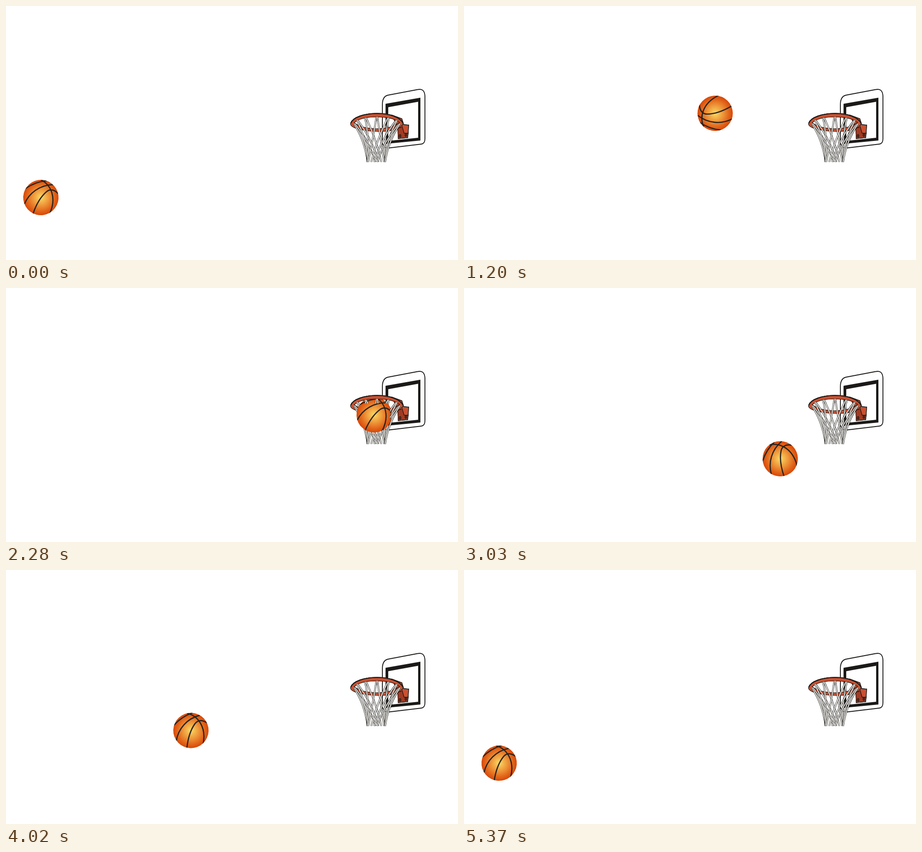
An HTML page with a canvas that plays this animation: 998x561 px, repeating every 5.4 s.

```html
<!DOCTYPE html>
<html lang="en">
<head>
<meta charset="utf-8">
<title>Basketball shot</title>
<style>
  html, body { margin: 0; width: 100%; height: 100%; overflow: hidden; background: #fff; }
  canvas { display: block; }
</style>
</head>
<body>
<canvas id="stage" width="998" height="561"></canvas>
<script>
const ctx = document.getElementById('stage').getContext('2d');
const HOP = 900, STEP = 30, R = 39, INK = '#1b1a18', RIM = '#cb5030';

// Six equal stretches: two handles, the end point, and the turn in degrees.
const start = [77, 423], startAngle = 37.5;
const hops = [
  { path: [[228, 433], [367, 291], [494, 393]], turn: 403 },
  { path: [[529, 226], [647, 80], [790, 62]], turn: 532 },
  { path: [[835, 115], [802, 421], [806, 435]], turn: 280 },
  { path: [[720, 354], [589, 351], [515, 422]], turn: 510 },
  { path: [[444, 333], [362, 333], [268, 411]], turn: 133 },
  { path: [[183, 300], [118, 379], [73, 432]], turn: 302 }
];

function ballAt(t) {
  const n = Math.floor(t / HOP), u = t / HOP - n, v = 1 - u;
  const [b, c, d] = hops[n].path, a = n ? hops[n - 1].path[2] : start;
  const [x, y] = [0, 1].map(k =>
    a[k] * v ** 3 + 3 * b[k] * v * v * u + 3 * c[k] * v * u * u + d[k] * u ** 3);
  const angle = hops.slice(0, n).reduce((sum, h) => sum + h.turn, startAngle) + hops[n].turn * u;
  return { x, y, angle };
}

function shape(d, fill, width, ink = INK) {
  const p = new Path2D(d);
  if (fill) { ctx.fillStyle = fill; ctx.fill(p, 'evenodd'); }
  if (width) { ctx.lineWidth = width; ctx.strokeStyle = ink; ctx.stroke(p); }
}

function drawBoard() {
  shape('M831 218Q831 200 843 197L909 184.5Q924 181 925 199V293Q925 304 917 305L846 313.5Q832 314 831 300Z', '#fff', 1.9);
  shape('M838 216L915 202.5V297L838 304.5ZM844 223.5V298L910 291V211.5Z', INK);
}

function drawRim() {
  shape('M865 270L877 267L879 280L888 281L887 291L866 293Z', '#a23a22', 1.2);
  shape('M852 241L874 249L878 262L889 263L888 281L879 281L874 264L862 262Z', RIM, 1.4);
  for (const [x, y] of [[870, 287], [883, 285]]) {
    shape(`M${x - 2} ${y}a2 3.2 0 1 0 4 0a2 3.2 0 1 0 -4 0`, '#6b2a1c', 1.2);
  }
  shape('M761 259C766 246 790 237 819 237C849 237 870 246 877 259C874 271 849 278 818 277C790 276 757 269 761 259Z' +
        'M769 258C779 265 796 271 818 271C842 271 858 266 869 257C858 248 841 245 818 245C796 245 778 249 769 258Z', RIM, 1.2);
  shape('M761 259C766 246 790 237.5 819 237.5C849 237.5 870 246 877 259', null, 2.2);
}

// Each hook on the far rim drops two strands that cross their neighbours.
function drawNet() {
  for (let i = 0; i <= 6; i++) {
    const u = i / 6, x = 819 - 50 * Math.cos(Math.PI * u), y = 260 - 15 * Math.sin(Math.PI * u);
    for (const side of [-1, 1]) {
      const end = Math.min(1, Math.max(0, u + side * 0.45));
      const mid = 793 + 51 * (u * 0.6 + end * 0.4), foot = 798 + 39 * end;
      const d = `M${x + side} ${y}Q${mid} 298 ${foot} 345`;
      shape(d, null, 3.5);
      shape(d, null, 1.9, '#fbfaf5');
    }
  }
}

function drawHoop() {
  drawRim();
  ctx.save();
  ctx.beginPath();
  ctx.rect(750, 230, 140, 114.5);
  ctx.clip();
  drawNet();
  ctx.restore();
}

function drawBall({ x, y, angle }) {
  ctx.save();
  ctx.translate(x, y);
  ctx.rotate(angle * Math.PI / 180);
  ctx.beginPath();
  ctx.arc(0, 0, R, 0, 7);
  ctx.clip();
  const glow = ctx.createRadialGradient(0, 0, 0, 0, 0, R);
  ['#fbdc66', '#f4b44c', '#ec9036', '#e36a1d', '#d84708']
    .forEach((color, i) => glow.addColorStop(i / 4, color));
  ctx.fillStyle = glow;
  ctx.fillRect(-R, -R, 2 * R, 2 * R);
  shape('M8 39Q-3 6 2 -18Q6 -33 26 -30M-20 34C-27 8 -19 -20 4 -39' +
        'M-39 5Q-31 -20 -12 -38M-24 -31C0 -36 28 -22 37 16', null, 2.6, '#25231f');
  ctx.restore();
}

function draw(now) {
  const t = Math.floor(now % (HOP * hops.length) / STEP) * STEP;
  ctx.clearRect(0, 0, 998, 561);
  drawBoard();
  drawHoop();
  drawBall(ballAt(t));
  // The upper rim and the right-hand strands stay in front of the ball.
  ctx.save();
  ctx.beginPath();
  ctx.rect(755, 230, 125, 25);
  ctx.rect(848, 255, 42, 50);
  ctx.clip();
  drawHoop();
  ctx.restore();
}

const begin = performance.now();
function tick() {
  draw(performance.now() - begin);
  requestAnimationFrame(tick);
}
tick();
</script>
</body>
</html>
```
